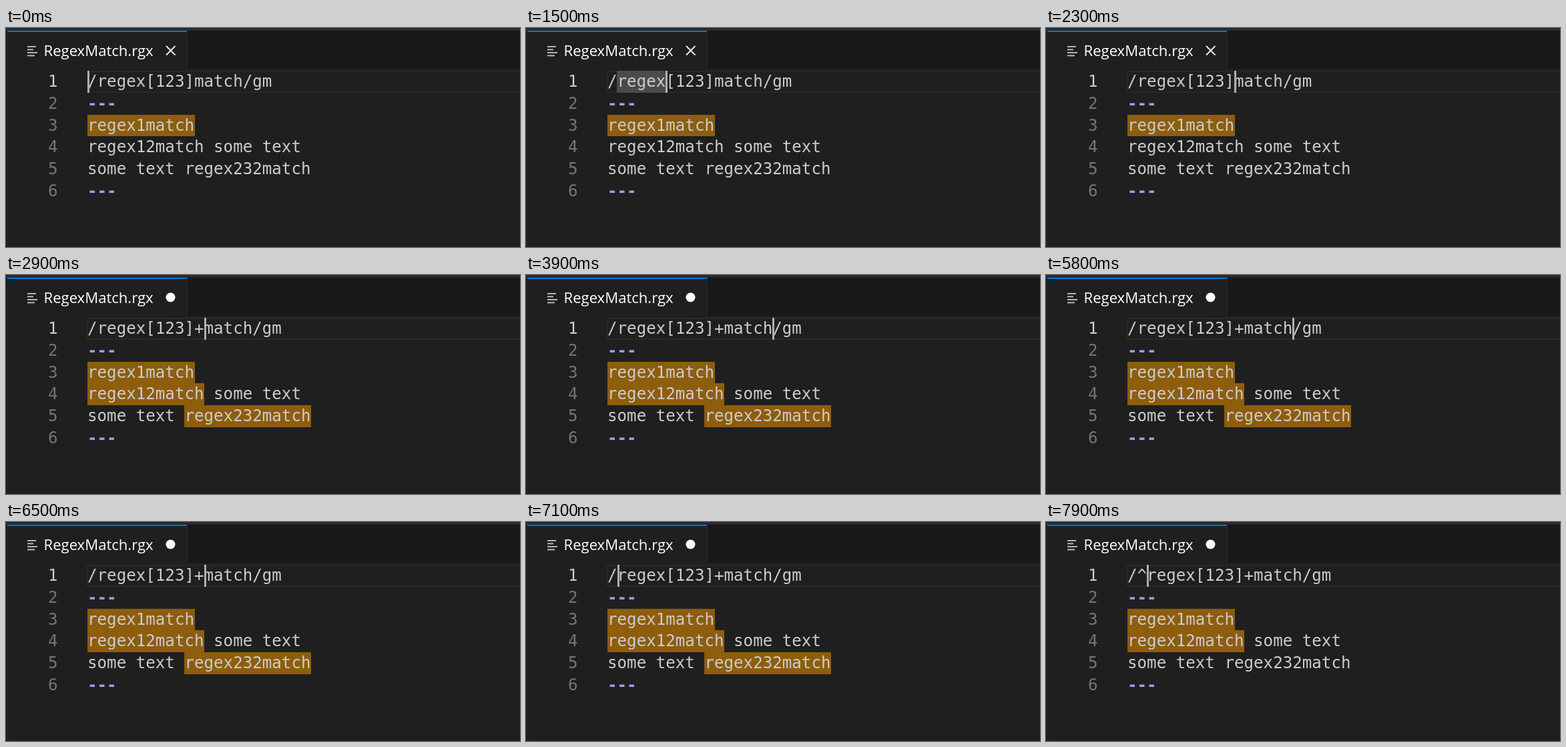
These frames come from a looping animation (770 by 328 pixels, 8 s). An HTML page with a canvas:

```html
<!DOCTYPE html>
<html lang="en">
<head>
<meta charset="utf-8">
<title>Regex editor</title>
<style>
  html, body { margin: 0; width: 100%; height: 100%; overflow: hidden; background: #1f1f1f; }
  canvas { display: block; }
</style>
</head>
<body>
<canvas id="stage" width="770" height="328"></canvas>
<script>
const ctx = document.getElementById('stage').getContext('2d');
const LOOP = 8000, BLINK = 500;
const LEFT = 122, TOP = 64, CHAR = 14.55, LINE = 32.8;
const MONO = '24.17px "DejaVu Sans Mono", monospace';
const BODY = ['---', 'regex1match', 'regex12match some text', 'some text regex232match', '---'];

// Each key press: time, caret column and, when edited, the new pattern.
const KEYS = [
  { at: -100, col: 0, pattern: 'regex[123]match' },
  { at: 1200, col: 6 },
  { at: 2000, col: 10 },
  { at: 2100, col: 11 },
  { at: 2800, col: 12, pattern: 'regex[123]+match' },
  { at: 3700, col: 17 },
  { at: 4300, col: 18, pattern: 'regex[123]+match$' },
  { at: 5700, col: 17, pattern: 'regex[123]+match' },
  { at: 6400, col: 12 },
  { at: 6600, col: 10 },
  { at: 6800, col: 7 },
  { at: 7000, col: 1 },
  { at: 7500, col: 2, pattern: '^regex[123]+match' },
];
// The word beside a resting caret is shaded.
const WORDS = [
  { from: 1500, to: 2000, start: 1, end: 6 },
  { from: 4100, to: 4300, start: 12, end: 17 },
  { from: 7300, to: 7500, start: 1, end: 6 },
];
const DIRTY_FROM = 2800;

const colX = col => LEFT + col * CHAR;
const rowY = row => Math.round(TOP + row * LINE);

function rect(color, x, y, w, h) {
  ctx.fillStyle = color;
  ctx.fillRect(x, y, w, h);
}

function text(color, font, string, x, y) {
  ctx.fillStyle = color;
  ctx.font = font;
  ctx.fillText(string, x, y);
}

function shade(color, row, start, end) {
  const x = Math.floor(colX(start)), y = rowY(row);
  rect(color, x, y, Math.ceil(colX(end)) - x, rowY(row + 1) - y);
}

function drawTab(dirty) {
  rect('#181818', 0, 0, 770, 63);
  rect('#2b2b2b', 0, 0, 770, 4);
  rect('#2b2b2b', 271, 62, 499, 1);
  rect('#1f1f1f', 2, 4, 269, 60);
  rect('#2b2b2b', 271, 4, 1, 59);
  rect('#0078d4', 2, 4, 269, 2);
  rect('#181818', 0, 4, 2, 324);
  rect('#2b2b2b', 2, 6, 1, 322);

  [13, 9, 15, 11].forEach((w, i) => rect('#c5c5c5', 32, 27 + i * 4.5, w, 1.8));
  text('#ffffff', '22.1px "Open Sans", sans-serif', 'RegexMatch.rgx', 56.5, 42);

  ctx.beginPath();
  if (dirty) {
    ctx.arc(246.5, 33.5, 7, 0, Math.PI * 2);
    ctx.fillStyle = '#ffffff';
    ctx.fill();
  } else {
    ctx.moveTo(240, 27); ctx.lineTo(253.5, 40.5);
    ctx.moveTo(253.5, 27); ctx.lineTo(240, 40.5);
    ctx.strokeStyle = '#f0f0f0';
    ctx.lineWidth = 1.9;
    ctx.stroke();
  }
}

function draw(t) {
  const key = KEYS.findLast(k => k.at <= t);
  const { pattern } = KEYS.findLast(k => k.at <= t && k.pattern);
  const regex = new RegExp(pattern);

  rect('#1f1f1f', 0, 0, 770, 328);
  drawTab(t >= DIRTY_FROM);

  ctx.strokeStyle = '#282828';
  ctx.lineWidth = 2;
  ctx.strokeRect(LEFT, TOP + 1, 700, 31);

  const word = WORDS.find(w => t >= w.from && t < w.to);
  if (word) shade('#4b4b4b', 0, word.start, word.end);

  ['/' + pattern + '/gm', ...BODY].forEach((line, row) => {
    const y = Math.round(88 + row * LINE);
    const match = row > 0 && line.match(regex);
    const fence = line === '---';
    if (match) shade('#8e5d0d', row, match.index, match.index + match[0].length);
    text(row ? '#6e7681' : '#cccccc', MONO, row + 1, 63, y);
    text(fence ? '#b392f0' : '#cccccc', (fence ? 'bold ' : '') + MONO, line, LEFT, y);
  });

  if ((t - key.at) % (2 * BLINK) < BLINK) {
    rect('#aeafad', Math.round(colX(key.col)), TOP, 3, 33);
  }
}

function tick() {
  draw(performance.now() % LOOP);
  requestAnimationFrame(tick);
}
tick();
</script>
</body>
</html>
```
